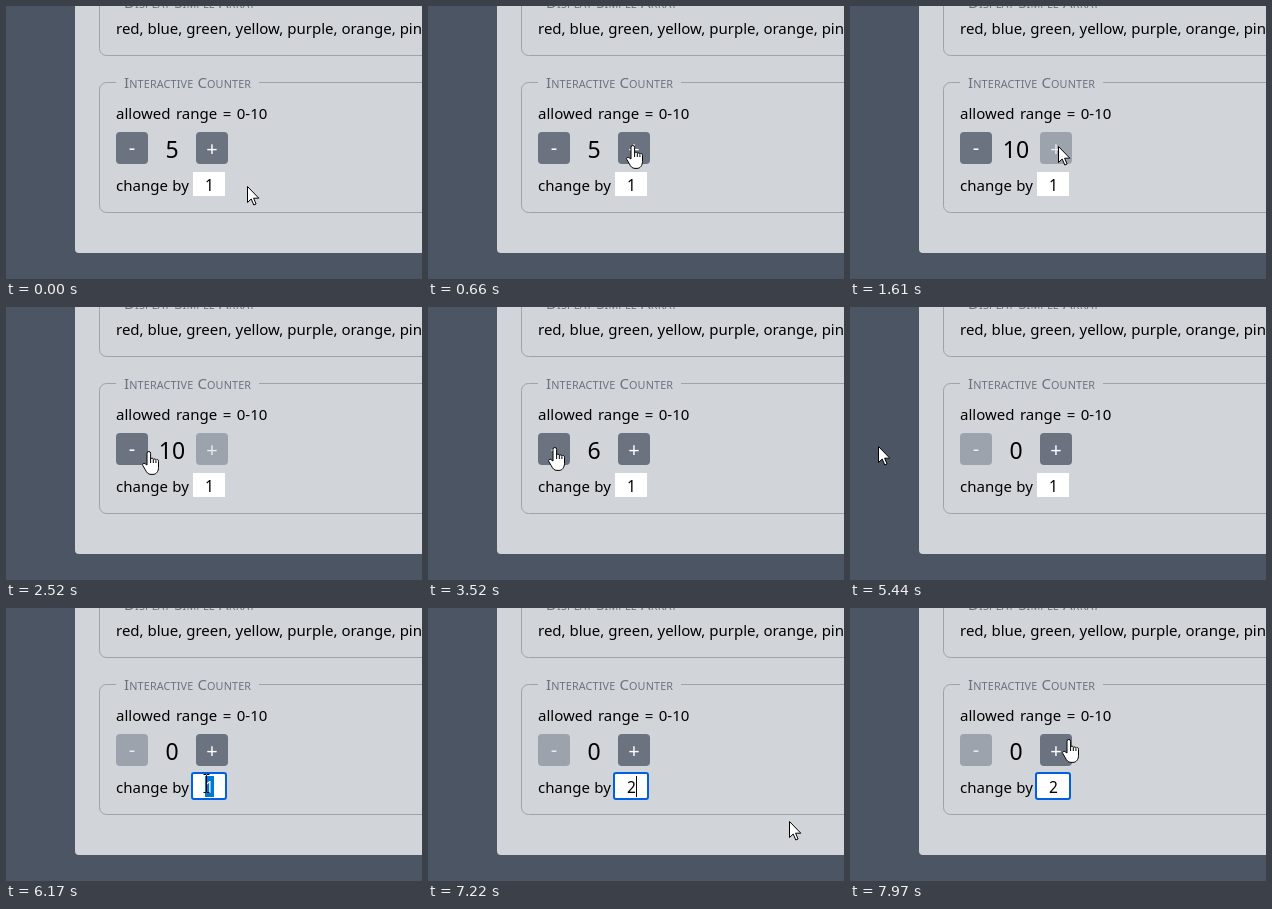
An HTML page for the animation above (8 s loop, 416 by 273 pixels).

```html
<!DOCTYPE html>
<html lang="en">
<head>
<meta charset="utf-8">
<title>Interactive Counter</title>
<style>
  html, body { margin: 0; width: 100%; height: 100%; overflow: hidden; background: #4b5563; }
  svg { display: block; font: 15px "Noto Sans", "Open Sans", sans-serif; }
  .legend { fill: #6b7280; letter-spacing: .15px; }
  .legend tspan { font-size: 10.8px; }
  .border { fill: none; stroke: #9ca3af; }
  .mid { text-anchor: middle; }
  .button rect { fill: #6b7280; }
  .button text { fill: #fff; font-size: 20px; }
  .off { opacity: .5; }
  #count { font-size: 23px; }
  #step { font-size: 15.5px; }
  #ring { fill: none; stroke: #0060df; stroke-width: 2; }
  #select { fill: #0078d7; }
  .cursor { fill: #fff; stroke: #000; stroke-linejoin: round; }
</style>
</head>
<body>
<svg width="416" height="273" viewBox="0 0 416 273">
  <rect x="69" y="-10" width="400" height="257" rx="4" fill="#d1d5d9"/>

  <path class="border" d="M93.5-5V42.5a7 7 0 0 0 7 7H420"/>
  <text class="legend" x="118" y="2">D<tspan>ISPLAY</tspan> S<tspan>IMPLE</tspan> A<tspan>RRAY</tspan></text>
  <text x="110" y="28">red, blue, green, yellow, purple, orange, pink, black</text>

  <path class="border" d="M110 76.5H100.5a7 7 0 0 0-7 7V199.5a7 7 0 0 0 7 7H420M253 76.5H420"/>
  <text class="legend" x="118" y="82">I<tspan>NTERACTIVE</tspan> C<tspan>OUNTER</tspan></text>
  <text x="110" y="113" word-spacing="1.6">allowed range = 0-10</text>

  <g class="button" id="minus">
    <rect x="110" y="126" width="32" height="32" rx="4"/>
    <text class="mid" x="126" y="149">-</text>
  </g>
  <text class="mid" id="count" x="166" y="152">5</text>
  <g class="button" id="plus">
    <rect x="190" y="126" width="32" height="32" rx="4"/>
    <text class="mid" x="206" y="150">+</text>
  </g>

  <text x="110" y="185" word-spacing=".5">change by</text>
  <rect x="187" y="166" width="32" height="24" fill="#fff"/>
  <rect id="ring" x="186" y="165" width="34" height="26" rx="2"/>
  <rect id="select" x="199" y="168" width="9" height="21"/>
  <text class="mid" id="step" x="203.5" y="185">1</text>
  <rect id="caret" y="168" width="1" height="21"/>

  <g class="cursor" id="arrow">
    <path d="M.5.5v16l3.7-3.5 2.6 6 2.3-1-2.5-5.8h5.2z"/>
  </g>
  <g class="cursor" id="hand">
    <path d="M5 14V2.3a1.8 1.8 0 0 1 3.6 0V8a1.4 1.4 0 0 1 2.7.6a1.4 1.4 0 0 1 2.6.8a1.4 1.4 0 0 1 2.6 1v6c0 4-2.2 7-5.5 7H9c-3 0-4.4-2-5.6-4.500L.8 14.500c-.8-1.800 1.200-2.800 2.400-1.700z"/>
    <path fill="none" d="M8.6 8v4M11.300 9v3M13.900 10v2"/>
  </g>
  <g class="cursor" id="beam">
    <path fill="none" d="M.5.5h2.500l.5 1 .5-1h2.500M3.500 1.500v16M.5 18.500h2.500l.5-1 .5 1h2.500"/>
  </g>
</svg>
<script>
  const LOOP = 8000;
  const $ = id => document.getElementById(id);
  const show = (id, on) => $(id).setAttribute("visibility", on ? "visible" : "hidden");

  // Pointer stops: time, shape, left, top
  const stops = [
    [0, "arrow", 241, 180], [120, "arrow", 223, 163], [270, "arrow", 201, 124],
    [420, "hand", 196, 119], [540, "hand", 197, 131], [660, "hand", 198, 139],
    [1610, "arrow", 208, 140], [1750, "arrow", 327, 151],
    [2250, "arrow", 262, 150], [2370, "arrow", 193, 150],
    [2520, "hand", 136, 144], [2640, "hand", 124, 141], [2760, "hand", 120, 140],
    [4540, "arrow", 126, 141], [4660, "arrow", 72, 144], [4780, "arrow", 30, 142],
    [5440, "arrow", 28, 139], [5560, "arrow", 74, 148], [5680, "arrow", 140, 160],
    [5800, "beam", 197, 166],
    [6540, "arrow", 290, 182], [6660, "arrow", 369, 195],
    [7220, "arrow", 361, 213], [7340, "arrow", 364, 219],
    [7490, "arrow", 342, 204], [7610, "arrow", 296, 179], [7730, "arrow", 254, 154],
    [7850, "arrow", 227, 136], [7970, "hand", 212, 131]
  ];
  const ups = [940, 1090, 1370, 1490, 1610];
  const downs = [3010, 3130, 3270, 3520, 3640, 3760, 3910, 4160, 4280, 4540];
  const focusAt = 6050, selectAt = 6170, typeAt = 7220, blinkAt = 7730;

  const passed = (times, t) => times.filter(s => s <= t).length;

  function draw(t) {
    const count = 5 + passed(ups, t) - passed(downs, t);
    $("count").textContent = count;
    $("minus").classList.toggle("off", count === 0);
    $("plus").classList.toggle("off", count === 10);

    const typed = t >= typeAt;
    const selected = t >= selectAt && !typed;
    $("step").textContent = typed ? 2 : 1;
    $("step").setAttribute("fill", selected ? "#fff" : "#000");
    show("ring", t >= focusAt);
    show("select", selected);
    show("caret", t >= focusAt && !selected && t < blinkAt);
    $("caret").setAttribute("x", typed ? 208 : 199);

    const [, shape, x, y] = stops.filter(s => s[0] <= t).pop();
    for (const id of ["arrow", "hand", "beam"]) show(id, id === shape);
    $(shape).setAttribute("transform", `translate(${x} ${y})`);
  }

  const start = performance.now();
  function tick() {
    draw((performance.now() - start) % LOOP);
    requestAnimationFrame(tick);
  }
  tick();
</script>
</body>
</html>
```
